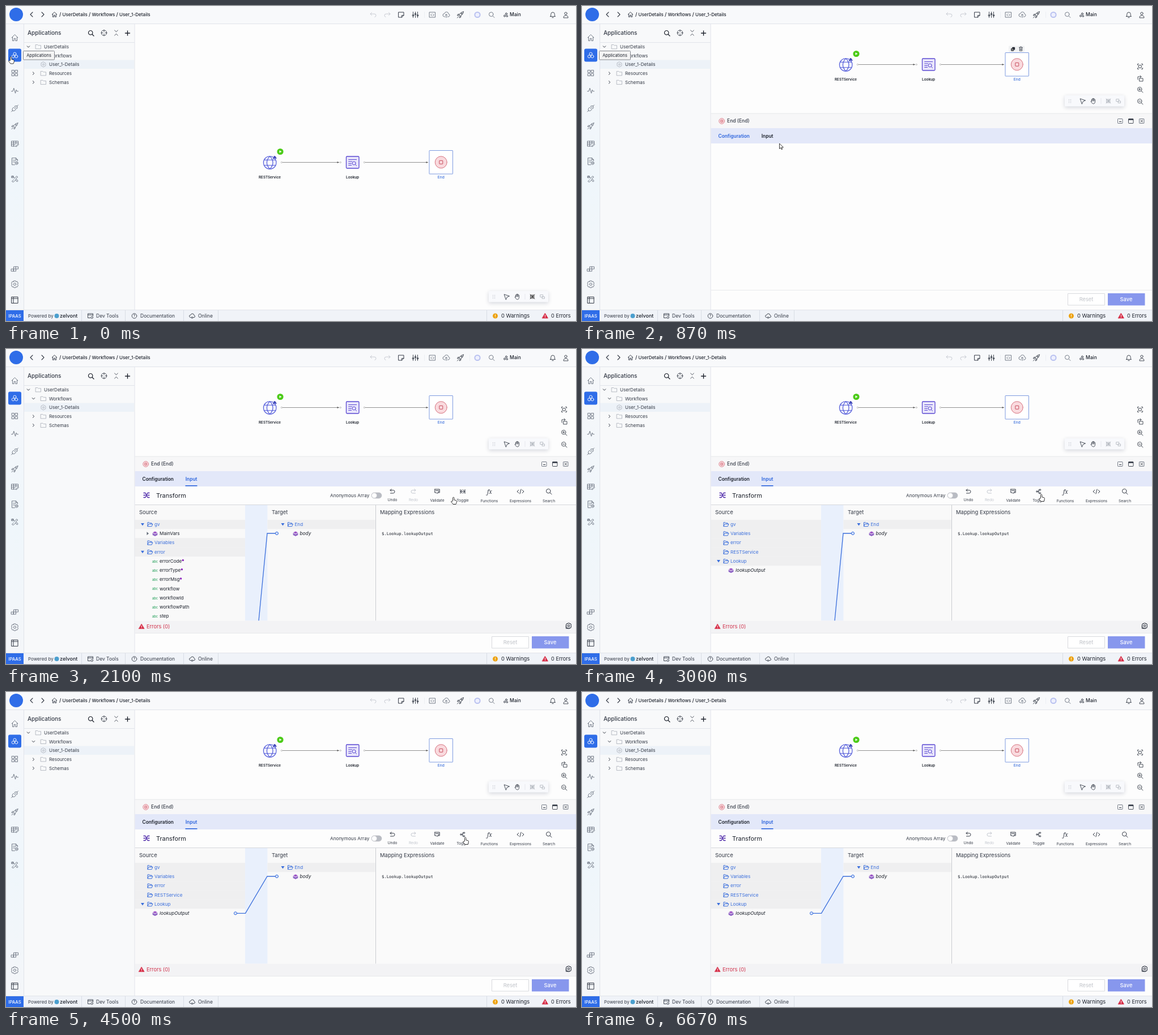
An HTML page with a canvas for the animation above (6700 ms loop, 1006 px wide and 557 px high).

```html
<!DOCTYPE html>
<html lang="en">
<head>
<meta charset="utf-8">
<title>Workflow editor</title>
<style>
html, body { margin: 0; width: 100%; height: 100%; overflow: hidden; background: #fdfdfd; }
canvas { display: block; width: 1006px; height: 557px; }
</style>
</head>
<body>
<canvas id="stage" width="1006" height="557"></canvas>
<script>
const g = document.getElementById('stage').getContext('2d');
const LOOP = 6700;
const SANS = 'Inter, "Open Sans", sans-serif';
const MONO = '"DejaVu Sans Mono", monospace';
const INK = '#343a46', DARK = '#1c212b', BLUE = '#3b6fdc', GREY = '#666e7b', PALE = '#c2c6ce', LINE = '#e1e4ea';

// Times at which the interface changes
const AT = { hover: 400, open: 540, leave: 1040, input: 1120, collapse: 2890, relink: 3150, gone: 5950 };
const PATH = [
  [0, 9, 90], [60, 9, 90], [420, 766, 274], [580, 766, 274], [870, 348.5, 243.5], [980, 328, 229],
  [1350, 328, 229], [2060, 790, 262.5], [2150, 790, 262.5], [2330, 811, 257.5], [4600, 811, 257.5],
  [4870, 408, 392], [4980, 412, 388], [5200, 451, 359.5], [5560, 476, 328]
];

const circ = (x, y, r) => `M${x + r} ${y}a${r} ${r} 0 1 1 ${-2 * r} 0a${r} ${r} 0 1 1 ${2 * r} 0`;
const box = (x, y, w, h) => `M${x} ${y}h${w}v${h}h${-w}z`;

const I = {
  home: 'M-5.5 0L0-5.5 5.5 0M-4-1V5.5H-1.3V1.5H1.3V5.5H4V-1',
  apps: circ(0, -2.7, 2.5) + circ(-2.8, 2, 2.5) + circ(2.8, 2, 2.5),
  grid: box(-5, -5, 4, 4) + box(1, -5, 4, 4) + box(-5, 1, 4, 4) + box(1, 1, 4, 4),
  pulse: 'M-6 1H-3.5L-1.7-4.5 1 4.5 2.7-1.5 3.8 1H6',
  plug: 'M-6 6L-4 4M-4 4q-1.5-2.5.5-4.5L-2-2 2 2 .5 3.5Q-2 5.5-4 4M6-6L4-4M4-4Q1.5-5.5-.4-3.5L3.6.5Q5.5-1.5 4-4',
  rocket: 'M5.5-5.5Q1-5.5-2.5 0L0 2.5Q5.5-1 5.5-5.5M-2-1H-4.5L-5.5 1.5-2.5 1M1 2L.5 4.5-1.5 5.5-1 2.5M-3 3L-5.5 5.5' + circ(2, -2, 1),
  table: 'M6 0V-4.5H-6V4.5H0M-6-1.5H6M-6 1.5H1M-2-4.5V4.5M2-4.5V0M1.5 4.5L6 0 7 1.5 3 5z',
  file: 'M0 6H-5V-6H2L5-3V-1M2-6V-3H5M-3-2H2M-3 1H0' + circ(3.2, 3, 2.6) + circ(3.2, 3, .8),
  tools: 'M-5-3Q-5-5-3-5L-1-2M1 1L4 5Q6 4 5 2L2 0M-2 1L-5 4Q-4 6-2 5L1 2M2-1L5-3Q5-5 3-5L-1-1' + box(-5.3, -5.3, 3, 3),
  blocks: box(-6, 0, 4, 4) + box(-2, 0, 4, 4) + box(2, -4, 4, 4) + 'M-2 0V-4H2',
  gear: 'M-1.6-6H1.6L2.2-4.4 4.2-5 6-1.8 4.8 0 6 1.8 4.2 5 2.2 4.4 1.6 6H-1.6L-2.2 4.4-4.2 5-6 1.8-4.8 0-6-1.8-4.2-5-2.2-4.4z' + circ(0, 0, 2.1),
  layout: box(-5.5, -5.5, 11, 11) + 'M-2.5-5.5V5.5M-5.5-2.8H5.5',
  find: circ(-.8, -.8, 3.7) + 'M2 2L5 5',
  aim: circ(0, 0, 4.8) + 'M0-4.8V-2M0 4.8V2M-4.8 0H-2M4.8 0H2',
  fold: 'M-2.8-4.5L0-1.8 2.8-4.5M-2.8 4.5L0 1.8 2.8 4.5',
  plus: 'M-4 0H4M0-4V4',
  folder: 'M-4.5-3.5H-1L0-2.3H4.5V3.8H-4.5z',
  open: 'M-4 3.3V-3.3H-1L0-2.2H3V-.5M-4 3.3L-2.3-.5H5L3.3 3.3z',
  hex: 'M0-4.5L4-2.2V2.2L0 4.5-4 2.2V-2.2z' + circ(0, 0, 1.5),
  undo: 'M-2.5-4L-5-1.5-2.5 1M-5-1.5H2Q5-1.5 5 1T3 4',
  redo: 'M2.5-4L5-1.5 2.5 1M5-1.5H-2Q-5-1.5-5 1T-3 4',
  undo2: 'M-1.8-4.5L-4-2.3-1.8-.2M-4-2.3H1.5Q4-2.3 4 .2T1.5 3H-3.5',
  redo2: 'M1.8-4.5L4-2.3 1.8-.2M4-2.3H-1.5Q-4-2.3-4 .2T-1.5 3H3.5',
  note: 'M-4.5-4.5H4.5V1L1 4.5H-4.5zM4.5 1H1V4.5',
  sliders: 'M-4-5V5M0-5V5M4-5V5' + circ(-4, 1.2, 1.4) + circ(0, -1.2, 1.4) + circ(4, 1.2, 1.4),
  code: box(-5, -4.5, 10, 9) + 'M-1-1.5L-2.8.3-1 2M1-1.5L2.8.3 1 2',
  cloud: 'M-2 3.5H-3.5Q-6 3-6 .5T-3.2-2Q-2.5-5 .5-5T4-1.6Q6.2-1 6 1T4 3.5H2M0 5V-1M-2 1L0-1 2 1',
  cloud2: 'M-2 2.7H-3Q-5 2.2-5 .3T-2.6-1.5Q-2-4 .5-4T3.5-1Q5-.7 5 1T3 2.7H2' + circ(0, 3, 1.3),
  team: circ(1, -1.6, 1.6) + circ(-2, 2, 1.5) + circ(2.3, 2.4, 1.3),
  bell: 'M-4.5 3H4.5L3.3 1.5V-1Q3-4.5 0-4.5T-3.3-1V1.5zM-1.2 5H1.2',
  user: circ(0, -2.3, 2.2) + 'M-4 5Q-4 1.2 0 1.2T4 5z',
  pointer: 'M-4-4L5-1 .8.8-1 5z',
  palm: 'M-3 .5V-3Q-2.2-4-1.5-3V-4.2Q-.6-5.2 0-4.2Q.8-5 1.5-4V-3Q2.5-4 3 -2.5V2Q2.5 5 0 5Q-2 5-4.6.7-3.9-.6-3 .5M-1.5-3V0M0-4V0M1.5-3V0',
  group: box(-3, -3, 6, 6) + box(-1.5, -1.5, 3, 3) + 'M-4-4L4 4M4-4L-4 4',
  ungroup: box(-3.8, -3.3, 4.5, 4) + box(-.5, 0, 4, 3.4),
  fit: box(-2.2, -2.2, 4.4, 4.4) + 'M-4.5-2.5V-4.5H-2.5M2.5-4.5H4.5V-2.5M4.5 2.5V4.5H2.5M-2.5 4.5H-4.5V2.5',
  rotate: box(-1, 0, 6, 5) + 'M-4 2V-3H2M0-5L2-3 0-1',
  check: 'M-4.2-4H4.2V2H1.5M-4.2-4V2H-2M-2.5-1.7H2.5M-1.5 2L0 3.5 3-.5',
  branch: circ(2.5, -3, 1.2) + circ(2.5, 3, 1.2) + circ(-3, 0, 1.2) + 'M-1.8 0H0V-3H1.3M0 0V3H1.3',
  split: 'M-4-3.5V3.5M4-3.5V3.5M-3.5 0H3.5M-1-3L-3.5 0-1 3M1-3L3.5 0 1 3',
  angle: 'M-3-2.7L-6 0-3 2.7M3-2.7L6 0 3 2.7M1-4L-1 4',
  dev: 'M0 3.5H-4.5V-4H4.5V0M-4.5-1.8H4.5' + circ(2.7, 2.7, 1.8),
  shuffle: 'M-5-4H-2L2 4H5M-5 4H-2L2-4H5M-5 0H-2M2 0H5'
};

function rect(x, y, w, h, c) { g.fillStyle = c; g.fillRect(x, y, w, h); }
function frame(x, y, w, h, c, fill, r = 0, lw = 1) {
  g.beginPath(); g.roundRect(x, y, w, h, r);
  if (fill) { g.fillStyle = fill; g.fill(); }
  if (c) { g.strokeStyle = c; g.lineWidth = lw; g.stroke(); }
}
function icon(d, x, y, c = GREY, lw = .9, fill) {
  g.save(); g.translate(x, y); g.lineJoin = g.lineCap = 'round';
  const p = new Path2D(d);
  if (fill) { g.fillStyle = fill; g.fill(p); }
  if (lw) { g.strokeStyle = c; g.lineWidth = lw; g.stroke(p); }
  g.restore();
}
function dot(x, y, r, fill, c, lw = 1) { icon(circ(0, 0, r), x, y, c, c ? lw : 0, fill); }
function line(pts, c, lw = 1) {
  g.beginPath(); pts.forEach(([x, y]) => g.lineTo(x, y));
  g.strokeStyle = c; g.lineWidth = lw; g.stroke();
}
// y is the middle of the capital letters
function text(s, x, y, size, c = INK, weight = 400, o = {}) {
  g.font = `${o.italic ? 'italic ' : ''}${weight} ${size}px ${o.font || SANS}`;
  g.textAlign = o.align || 'left'; g.fillStyle = c;
  g.fillText(s, x, y + size * .36);
}
function chevron(x, y, down) { icon(down ? 'M-2.3-1.2L0 1.2 2.3-1.2' : 'M-1.2-2.3L1.2 0-1.2 2.3', x, y, INK, 1); }
function caret(x, y, down = true, c = BLUE) { icon(down ? 'M-3-2H3L0 2.5z' : 'M-1.5-3V3L2 0z', x, y, c, 0, c); }
function layers(x, y) {
  icon('M0-3.8L4-1.8 0 .2-4-1.8z', x, y, 0, 0, '#9b4fc4');
  icon('M-4 0L0 2 4 0M-4 1.9L0 3.9 4 1.9', x, y, '#7540b8', 1.2);
}
function warn(x, y, s = 1) {
  g.save(); g.translate(x, y); g.scale(s, s);
  icon('M0-4.5L5 4H-5z', 0, 0, '#d62b45', .8, '#d62b45');
  rect(-.5, -1.8, 1, 3.2, '#fff'); rect(-.5, 2, 1, 1, '#fff');
  g.restore();
}

function topBar() {
  rect(0, 0, 1006, 32, '#f8f9fb'); rect(0, 31, 1006, 1, LINE);
  dot(18, 15, 12, '#2f6de8');
  icon('M2-4L-2 0 2 4', 45, 15, INK, 1.1); icon('M-2-4L2 0-2 4', 65, 15, INK, 1.1);
  g.save(); g.translate(85.5, 15); g.scale(.78, .78); icon(I.home, 0, 0, INK, 1.2); g.restore();
  [94, 146, 194.5].forEach(x => text('/', x, 15, 9, DARK, 500));
  text('UserDetails', 99.5, 15, 8, DARK, 500);
  text('Workflows', 151.5, 15, 8, DARK, 500);
  text('User_1-Details', 200, 15, 8.1, DARK, 500);
  icon(I.undo, 648, 15.5, PALE); icon(I.redo, 673, 15.5, PALE);
  icon(I.note, 697.5, 15.5, INK, 1); icon(I.sliders, 722.5, 15.5, INK);
  icon(I.code, 752.5, 15.5); icon(I.cloud, 777, 15.5); icon(I.rocket, 802, 15.5, INK);
  [738, 818].forEach(x => rect(x, 10, 1, 11, '#eceef2'));
  dot(832, 15.5, 4.6, '#eef0fd', '#b9c1f0', 2);
  icon(I.find, 857, 15.5); icon(I.team, 882, 15.5, INK, 1);
  text('Main', 889, 15.3, 8.5, DARK, 500);
  icon(I.bell, 965, 15.5, INK); icon(I.user, 988, 15.5, INK);
}

function sideBar() {
  const s = g.createLinearGradient(0, 32, 0, 537);
  s.addColorStop(0, '#f6f7fa'); s.addColorStop(.55, '#eff6fb'); s.addColorStop(1, '#f4f6f9');
  rect(0, 32, 31, 505, s); rect(31, 32, 1, 505, LINE);
  frame(4, 75.5, 23, 23, 0, '#2f6de8', 3);
  const names = ['home', 'apps', 'grid', 'pulse', 'plug', 'rocket', 'table', 'file', 'tools'];
  names.forEach((n, i) => icon(I[n], 15.5, 56 + 31.25 * i, i === 1 ? '#fff' : GREY));
  icon(I.blocks, 15.5, 465); icon(I.gear, 15.5, 492); icon(I.layout, 15.5, 520, INK, 1);
}

function appTree() {
  rect(32, 32, 195, 505, '#f8f9fa'); rect(226.5, 32, 1, 505, LINE); rect(32, 64, 195, 1, LINE);
  text('Applications', 38, 47.5, 10, INK, 500);
  icon(I.find, 150, 48, DARK, 1.2); icon(I.aim, 173, 47.5, INK); icon(I.fold, 194.5, 47.5, INK); icon(I.plus, 214.5, 48, DARK, 1.4);
  rect(32, 95.5, 194, 15.5, '#edf2f8');
  ['UserDetails', 'Workflows', 'User_1-Details', 'Resources', 'Schemas'].forEach((s, i) => {
    const y = 72 + 15.7 * i, x = i ? 66 : 57;
    if (i !== 2) chevron(x - 17.5, y, i < 2);
    icon(i === 2 ? I.hex : I.folder, x, y, '#a8adb6', .8);
    text(s, x + 10, y, 8.05);
  });
}

function statusBar() {
  rect(0, 537, 1006, 20, '#f0f3f8'); rect(0, 537, 1006, 1, LINE);
  rect(0, 538, 31, 19, '#2f6de8');
  text('IPAAS', 15.5, 547.8, 7.7, '#fff', 500, { align: 'center' });
  text('Powered by', 39, 547.8, 8);
  dot(89.5, 548, 4, '#4b9fce');
  text('zelvont', 95, 547.5, 9, DARK, 500);
  [133, 210, 313, 374, 848].forEach(x => rect(x, 538, 1, 19, '#d9dde5'));
  icon(I.dev, 149, 548, INK); text('Dev Tools', 159, 548, 8.5);
  dot(226.5, 548, 4.3, 0, INK, .9); text('?', 226.5, 548, 6.5, INK, 500, { align: 'center' });
  text('Documentation', 237, 548, 8.5);
  icon(I.cloud2, 328.5, 548, INK); text('Online', 339, 548, 8.6);
  dot(863.5, 548, 4.5, '#eda313'); rect(863, 545.5, 1, 3, '#fff'); rect(863, 549.5, 1, 1, '#fff');
  text('0 Warnings', 874, 548, 9.4, DARK);
  warn(951.5, 548); text('0 Errors', 962, 548, 9.2, DARK);
}

function edge(x1, x2) {
  line([[x1 + 1, 276.5], [x2, 276.5]], '#858585', .9);
  dot(x1 - .5, 276.5, 1.3, '#fff', '#aaa', .7);
  icon('M0 0L-3.5-1.6V1.6z', x2, 276.5, 0, 0, '#555');
}
function flow(hover) {
  const a = '#4b54d8';
  icon(circ(0, 0, 11.3) + 'M0-11.3Q-10.5 0 0 11.3Q10.5 0 0-11.3M-10-4.7H10M-10 4.7H10', 465.7, 277, a, 1.1, '#f0f1fd');
  icon('M0 0L3-3M1.5-3.5L4.5-.5', 472, 269.5, '#3a42b5', 2);
  dot(484, 257.5, 5.6, '#4ccb18'); icon('M-1.5-2.3V2.3L2.5 0z', 484, 257.5, 0, 0, '#fff');
  edge(487, 588); dot(590.3, 276.5, 1.2, '#fff', '#aaa', .7);
  edge(633, 745);
  frame(600.5, 266, 22.5, 21, '#5a48d2', '#e9e6fb', 1.5, 1.3);
  icon('M-7-5H7M-7-1.5H-1M-7 2H-2M-7 5H-2' + circ(2.5, 1.5, 3) + 'M4.7 3.7L7 6', 611.7, 276.5, '#5a48d2', 1);
  frame(747, 255.5, 41.5, 41.5, '#7e9be0', '#fff', .5);
  dot(767.8, 276.3, 10.5, '#f9dade', '#d7717e');
  frame(764.8, 273.3, 6, 6, '#c64a5b', 0, .5);
  const mid = { align: 'center' };
  text('RESTService', 465.5, 302.6, 6.25, DARK, 600, mid);
  text('Lookup', 611.5, 302.6, 6.4, DARK, 600, mid);
  text('End', 767.8, 302.6, 6.6, BLUE, 500, mid);
  if (hover) {
    frame(753, 243.5, 28, 11, 0, '#f1f2f3', 1);
    frame(759.5, 246, 4.3, 4.3, DARK, DARK, .5, .5); frame(757.5, 248, 4.3, 4.3, DARK, '#777', .5, .7);
    icon('M-3-2.5H3M-2.2-2.5V3.5H2.2V-2.5M-1-3.7H1M-.7-.5V2M.7-.5V2', 774.5, 248.8, INK, .8);
  }
}

function toolBox(small) {
  g.save(); g.shadowColor = 'rgba(60,70,100,.22)'; g.shadowBlur = 7; g.shadowOffsetY = 2;
  frame(852, 504, 105, 19.5, 0, '#f8f9fc', 1.5); g.restore();
  for (let i = 0; i < 6; i++) rect(859 + 3 * (i % 2), 511 + 2.6 * (i >> 1), 1.1, 1.1, '#b8bcc5');
  icon(I.pointer, 883.5, 514, INK); icon(I.palm, 902.5, 514, INK, .8);
  rect(915.5, 509, 1, 10, '#e6e8ed');
  icon(I.group, 929, 514, small ? '#b4b8c0' : '#444', .9); icon(I.ungroup, 947, 514, '#b4b8c0');
}

function panel() {
  icon(I.fit, 985, 107, INK); icon(I.rotate, 985, 128, INK);
  icon(I.find + 'M-2.5-.8H.9M-.8-2.5V.9', 985, 148, INK); icon(I.find + 'M-2.5-.8H.9', 985, 169, INK);
  rect(227.5, 190, 779, 347, '#fdfdfd'); rect(227.5, 190, 779, 26, '#f7f7f8'); rect(227.5, 189.5, 779, 1, '#e6e7ea');
  dot(246.7, 203.5, 4.9, '#f9dade', '#d7717e', .8); frame(245, 201.8, 3.4, 3.4, '#c64a5b', 0, 0, .8);
  text('End (End)', 256, 203.3, 8.5, INK, 500);
  frame(945.5, 199.5, 8.5, 8, GREY, 0, .8, .9); rect(948, 204, 4, 1, INK);
  frame(964.5, 199.5, 8.5, 8, INK, 0, .8, .9); rect(964.5, 199.5, 8.5, 2.2, INK);
  frame(983.5, 199.5, 8.5, 8, GREY, 0, .8, .9); icon('M-2-2L2 2M2-2L-2 2', 987.8, 203.5, INK);
  rect(227.5, 216, 779, 27, '#e3e8f9');
  rect(227.5, 502, 779, 1, '#e8e9ec');
  frame(857.5, 508.5, 65, 20.5, '#d8dade', '#fff');
  text('Reset', 890, 518.8, 9.3, '#c0c3c9', 400, { align: 'center' });
  rect(928, 508, 65.5, 21.5, '#8797ed');
  text('Save', 960.5, 518.8, 9.3, '#fff', 500, { align: 'center' });
}
function tabs(input) {
  text('Configuration', 240.5, 229.7, 8.35, input ? DARK : '#2c64dd', 600);
  text('Input', 316.8, 229.7, 8.35, input ? '#2c64dd' : DARK, 600);
  if (input) rect(316.5, 241, 21, 1.6, '#2c64dd');
}

function folderRow(s, y, x, w, open, fx) {
  rect(x, y - 8.1, w, 16.3, '#efeff0');
  if (open) caret(fx - 13, y);
  icon(I.open, fx, y, BLUE, 1);
  text(s, fx + 8, y, 8.1, BLUE);
}
function toolbar(collapsed) {
  icon(I.shuffle, 248, 258.5, '#4c27a8', 1.3);
  text('Transform', 265, 259, 10.9, DARK);
  text('Anonymous Array', 572, 259, 8.2);
  frame(645, 254, 18, 10, '#b5b8be', '#b9bcc3', 5, .6); dot(650, 259, 4.6, '#fff', '#c6c8cd', .6);
  const items = [['Undo', 682, 266.5, I.undo2], ['Redo', 719, 266.5, I.redo2], ['Validate', 761, 267.3, I.check],
    ['Toggle', 806, 267.3, collapsed ? I.branch : I.split], ['Functions', 853, 268.7, ''],
    ['Expressions', 908, 268.7, I.angle], ['Search', 958, 268.7, I.find]];
  items.forEach(([s, x, y, d]) => {
    const c = s === 'Redo' ? PALE : INK;
    icon(d, x, 252, c, 1);
    text(s, x, y, 6.7, c, 400, { align: 'center' });
  });
  text('ƒx', 853, 252, 10, INK, 400, { align: 'center', italic: true, font: '"Noto Serif", serif' });
  rect(227.5, 275, 779, 1, '#d5d7db');
}
function transform(collapsed, linked) {
  toolbar(collapsed);
  rect(227.5, 276, 195, 204.5, '#f9f9f9'); rect(461.5, 276, 190, 204.5, '#f9f9f9');
  rect(653, 276, 353, 204.5, '#fafafa');
  rect(422, 276, 39.5, 204.5, '#e9f0fc'); rect(652, 276, 1, 204.5, '#c9cbd0');
  text('Source', 235, 288.5, 9.5); text('Target', 469, 288.5, 9.4); text('Mapping Expressions', 660, 288.5, 9.5);

  const row = i => 310 + 16.25 * i;
  const dir = (s, i, open, fx = 254) => folderRow(s, row(i), 227.5, 194.5, open, fx);
  if (collapsed) {
    ['gv', 'Variables', 'error', 'RESTService', 'Lookup'].forEach((s, i) => dir(s, i, i === 4));
    layers(263, row(5)); text('lookupOutput', 271, row(5), 8.2, DARK, 400, { italic: true });
  } else {
    dir('gv', 0, true);
    caret(250, row(1), false, GREY); layers(263, row(1)); text('MainVars', 271, row(1), 8.2, DARK);
    dir('Variables', 2); dir('error', 3, true);
    ['errorCode', 'errorType', 'errorMsg', 'workflow', 'workflowId', 'workflowPath', 'step'].forEach((s, i) => {
      const y = row(4 + i);
      text('abc', 258, y + .5, 5.6, '#2ba35f', 500); text(s, 271, y, 8.15, DARK);
      if (i < 3) dot(273 + g.measureText(s).width, y - 1.5, 1.8, '#8b27ba');
    });
  }
  folderRow('End', row(0), 461.5, 190, true, 501.5);
  layers(511, row(1)); text('body', 518.5, row(1), 8.3, DARK, 400, { italic: true });
  text('$.Lookup.lookupOutput', 663, 326.3, 7.2, DARK, 400, { font: MONO });

  line([[478, 326], [461, 326], ...(linked ? [[422.5, 391.3], [405, 391.3]] : [[446, 480.5]])], BLUE, 1.3);
  dot(478, 326, 2.6, '#d5e2fb', BLUE);
  if (linked) dot(405, 391.3, 2.6, '#d5e2fb', BLUE);
  rect(227.5, 480.5, 779, 21.5, '#f3f3f5');
  warn(239.3, 490.8, .95); text('Errors (0)', 248, 490.8, 9.2, '#d0304a');
  g.save(); g.translate(993, 489.5); g.scale(.78, .78);
  icon(I.gear, 0, 0, INK, 1.3); icon('M-6 0V6H2', 0, 0, INK, 1.2); g.restore();
}

function tooltip() {
  frame(30.5, 79.5, 55, 15.5, '#85888e', '#f4f4f4', 1);
  text('Applications', 58, 87, 7.5, DARK, 400, { align: 'center' });
}

function cursor(t) {
  if (t >= AT.gone) return;
  let [, x, y] = PATH[PATH.length - 1];
  for (let i = 1; i < PATH.length; i++) {
    const [t0, x0, y0] = PATH[i - 1], [t1, x1, y1] = PATH[i];
    if (t <= t1) {
      const k = (t - t0) / (t1 - t0), e = k * k * (3 - 2 * k);
      x = x0 + (x1 - x0) * e; y = y0 + (y1 - y0) * e;
      break;
    }
  }
  const hand = t < 110 || (t > 390 && t < 600) || (t > 930 && t < 1420) || (t > 1990 && t < 4630);
  icon(hand
    ? 'M-1.5 6V.9a1.2 1.2 0 0 1 2.4 0V4.4L4.2 5.2Q5.6 5.6 5.4 7.2L4.8 10.2 4 12H-1L-4.4 7.6Q-4.4 6-2.9 6.6z'
    : 'M0 0V9L2.2 7 3.7 10.3 5.1 9.7 3.7 6.5H6.5z', x, y, '#222', .9, '#fff');
}

function draw(t) {
  const opened = t >= AT.open, input = t >= AT.input;
  rect(0, 0, 1006, 557, '#fdfdfd');
  g.save(); g.translate(0, opened ? -173 : 0); flow(t >= AT.hover && t < AT.leave); g.restore();
  g.save(); g.translate(0, opened ? -346 : 0); toolBox(opened); g.restore();
  if (opened) { panel(); tabs(input); }
  if (input) transform(t >= AT.collapse, t >= AT.relink);
  topBar(); sideBar(); appTree(); statusBar();
  if (t < AT.leave) tooltip();
  cursor(t);
}

const start = performance.now();
function tick() {
  draw((performance.now() - start) % LOOP);
  requestAnimationFrame(tick);
}
tick();
</script>
</body>
</html>
```
